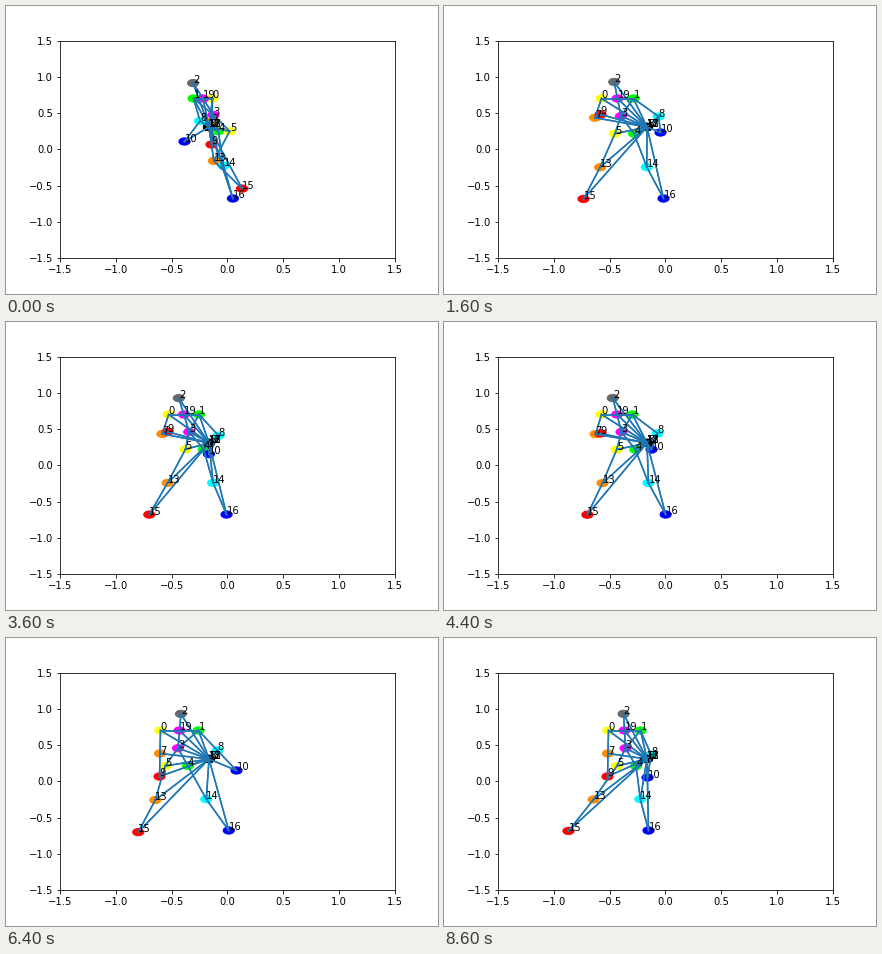
Recreate the animation shown at these times as a matplotlib script. Size 432 by 288 pixels, loop 8.8 s.

```python
import numpy as np
import matplotlib.pyplot as plt
from matplotlib.animation import FuncAnimation
from matplotlib.collections import LineCollection
from matplotlib.patches import Circle

plt.rcParams.update({"font.family": "DejaVu Sans", "font.size": 10})

FRAMES, INTERVAL = 44, 200
KEYS = [0, 8, 15, 22, 32, 39, 43]

# Controls of the figure at each key, in stage pixels.
CONTROLS = {
    "neck_x": [196.5, 173, 181, 172.5, 173, 176, 180],
    "width": [-19, 32, 30, 31, 38, 4, 32],
    "lean": [21, 7, 12, 9, -3, 21, 2],
    "raised": [0, 1, 1, 0.9, 0, 0, 0],
    "hand_dx": [-9, 27, 3, 19, 38, 8, 7],
    "hand_dy": [43, 34, 43, 35, 40, 48, 47],
    "stance": [231, 179, 181, 182, 177, 203, 164],
}
NECK_Y, SPINE, LEG = 92, 35.5, 100
ANCHOR = np.array([202.5, 120.5])
ANCHORED = (6, 11, 12, 17, 18)

COLORS = {
    0: "yellow", 1: "lime", 2: "dimgray", 3: "magenta", 4: "lime",
    5: "yellow", 7: "darkorange", 8: "cyan", 9: "red", 10: "blue",
    13: "darkorange", 14: "cyan", 15: "red", 16: "blue", 19: "magenta",
}
BONES = [(2, 19), (19, 0), (19, 1), (19, 3), (0, 7), (7, 9), (1, 8), (8, 10),
         (1, 3), (3, 4), (3, 5), (5, 13), (13, 15), (4, 14), (14, 16)]
BONES += [(joint, 6) for joint in COLORS]


def vec(x, y):
    return np.array([x, y], dtype=float)


def to_axes(point):
    return (point[0] - 220.9) / 111.6, (142.78 - point[1]) / 72.48


def elbow(shoulder, hand, upper, direction):
    """Midpoint of the arm, pushed out as far as the arm is slack."""
    slack = max(0, upper - np.hypot(*(hand - shoulder)) / 2)
    return (shoulder + hand) / 2 + slack * direction


def pose(frame):
    c = {name: np.interp(frame, KEYS, v) for name, v in CONTROLS.items()}
    width, lean = c["width"], c["lean"]

    neck = vec(c["neck_x"], NECK_Y)
    torso = vec(lean, np.sqrt(SPINE ** 2 - (0.65 * lean) ** 2))
    pelvis = neck + torso
    half = vec(width / 2, 0)
    left, right = neck - half, neck + half
    left_hip, right_hip = pelvis - 0.6 * half, pelvis + 0.6 * half

    left_hand = left + vec(-1, 46 - 30 * c["raised"])
    right_hand = right + vec(c["hand_dx"], c["hand_dy"])

    # Turning sideways bends the left knee and lifts its foot.
    bend = 0.45 * (width - 30)
    step = 12 + 0.875 * width
    left_foot = vec(c["stance"] - step, NECK_Y + LEG + 0.45 * bend)
    right_foot = vec(c["stance"] + step, NECK_Y + LEG)

    joints = {
        0: left, 1: right, 2: neck - 0.47 * torso, 3: neck + torso / 2,
        4: right_hip, 5: left_hip, 19: neck,
        7: elbow(left, left_hand, 23, vec(-0.4, 0.75)),
        8: elbow(right, right_hand, 27, vec(2.2, 0.2)),
        9: left_hand, 10: right_hand,
        13: (left_hip + left_foot) / 2 + vec(bend, 1),
        14: (right_hip + right_foot) / 2 + vec(-2, 1),
        15: left_foot, 16: right_foot,
    }
    joints.update({j: ANCHOR for j in ANCHORED})
    return {j: to_axes(p) for j, p in joints.items()}


fig = plt.figure(figsize=(6, 4), dpi=72, facecolor="white")
ax = fig.add_axes([0.125, 0.125, 0.775, 0.755])
ax.set(xlim=(-1.5, 1.5), ylim=(-1.5, 1.5))
ax.set_xticks(np.arange(-1.5, 1.6, 0.5))
ax.set_yticks(np.arange(-1.5, 1.6, 0.5))

dots = [ax.add_patch(Circle((0, 0), 0.05, color=COLORS.get(j, "black")))
        for j in range(20)]
labels = [ax.text(0, 0, str(j)) for j in range(20)]
bones = ax.add_collection(LineCollection(
    [], colors="#1f77b4", linewidths=1.5, capstyle="projecting", zorder=2))


def draw(frame):
    joints = pose(frame)
    for j in range(20):
        dots[j].center = joints[j]
        labels[j].set_position(joints[j])
    # Each bone is stroked in both directions, which firms up its edges.
    bones.set_segments([(joints[a], joints[b])
                        for p, q in BONES for a, b in ((p, q), (q, p))])
    return [*dots, bones, *labels]


anim = FuncAnimation(fig, draw, frames=FRAMES, interval=INTERVAL,
                     repeat=True, repeat_delay=0, blit=False)
plt.show()
```
